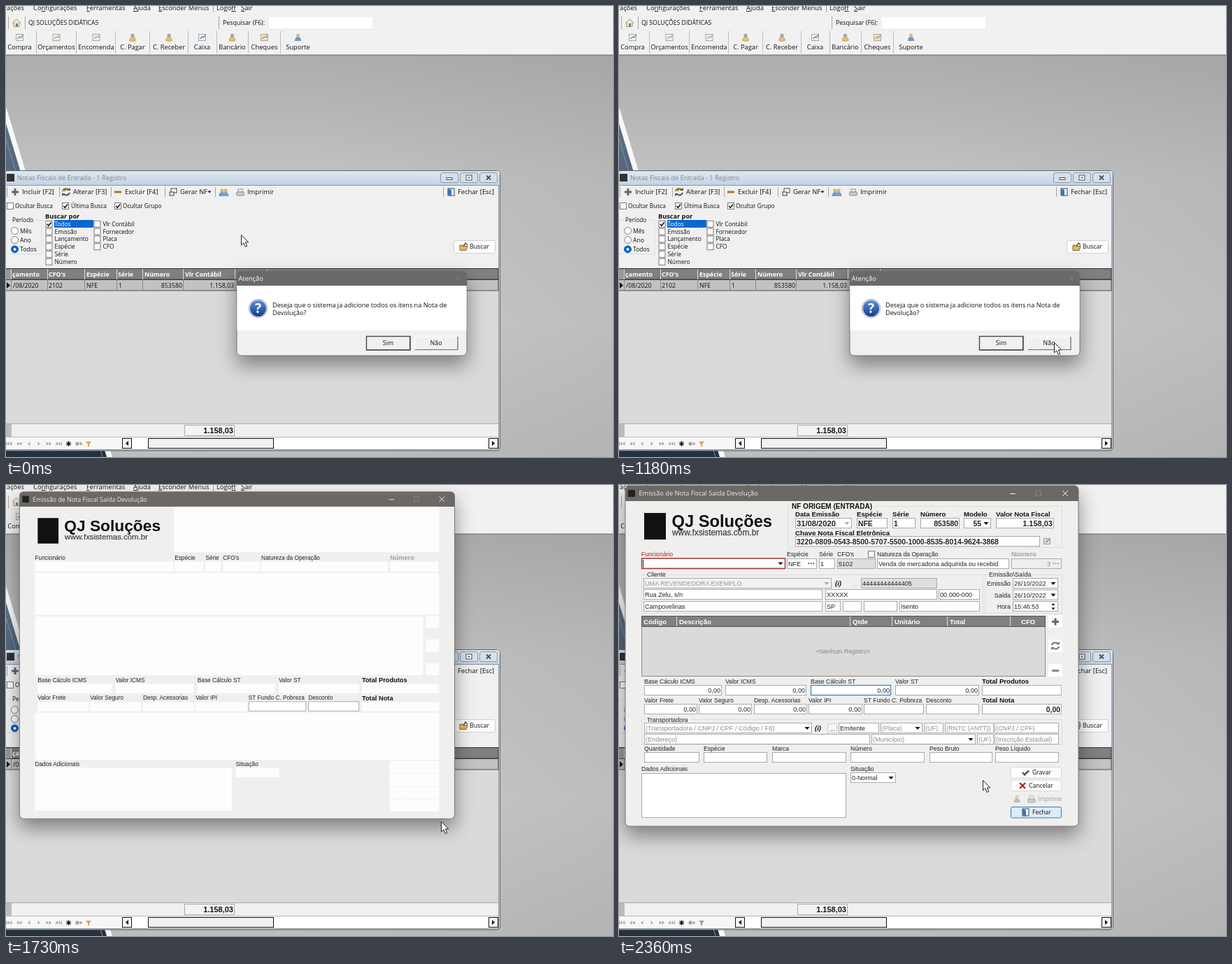
Animation, 868 px wide and 645 px high, one loop 2430 ms. Source, as an HTML page:

```html
<!DOCTYPE html>
<html lang="pt-BR">
<head>
<meta charset="utf-8">
<title>Nota de devolução</title>
<style>
html, body { margin: 0; width: 100%; height: 100%; overflow: hidden; background: #f0f0f0; }
svg { display: block; width: 100vw; height: 100vh; }
text { white-space: pre; }
.ui { font-family: "Open Sans", "Noto Sans", sans-serif; }
.form { font-family: "Liberation Sans", Arial, sans-serif; }
.shadow { filter: drop-shadow(0 13px 14px rgba(0,0,0,.42)); }
</style>
</head>
<body>
<svg id="stage" viewBox="0 0 868 645" xmlns="http://www.w3.org/2000/svg"></svg>
<script>
const LOOP = 2430;

// Drawing helpers; text y is the middle of the capitals.
const rect = (x, y, w, h, fill, stroke = 'none', more = '') =>
  `<rect x="${x}" y="${y}" width="${w}" height="${h}" fill="${fill}" stroke="${stroke}" ${more}/>`;
const path = (d, fill = 'none', stroke = 'none', width = 1) =>
  `<path d="${d}" fill="${fill}" stroke="${stroke}" stroke-width="${width}"/>`;
const circle = (x, y, r, fill, stroke = 'none') =>
  `<circle cx="${x}" cy="${y}" r="${r}" fill="${fill}" stroke="${stroke}"/>`;
const group = (id, body, cls = '') => `<g id="${id}" class="${cls}">${body}</g>`;
const escape = s => s.replace(/</g, '&lt;').replace(/>/g, '&gt;')
  .replace(/_(.)/g, '<tspan text-decoration="underline">$1</tspan>');
const text = (x, y, s, size, fill = '#111', more = '') =>
  `<text x="${x}" y="${(y + size * .36).toFixed(2)}" font-size="${size}" fill="${fill}" ${more}>${escape(s)}</text>`;
const BOLD = 'font-weight="700"', MID = 'text-anchor="middle"', END = 'text-anchor="end"';
const vline = (x, y1, y2, c = '#a5a5a5') => path(`M${x + .5} ${y1}V${y2}`, 'none', c);
const down = (x, y, c = '#111') => path(`M${x - 3.5} ${y - 1.5}h7l-3.5 4z`, c);
const plus = (x, y, c = '#666') => path(`M${x - 5} ${y}h10M${x} ${y - 5}v10`, 'none', c, 3);
const minus = (x, y, c = '#666') => path(`M${x - 5} ${y}h10`, 'none', c, 3);
const cycle = (x, y, c = '#666') => path(`M${x - 5} ${y - 1}a5 4.5 0 0 1 9 -1.5M${x + 5} ${y + 1}a5 4.5 0 0 1 -9 1.5`, 'none', c, 2)
  + path(`M${x + 1} ${y - 2}h5v-4zM${x - 1} ${y + 2}h-5v4z`, c);
const printer = (x, y, c = '#888') => rect(x - 3, y - 5, 6, 4, '#fff', c) + rect(x - 5.5, y - 1, 11, 5, '#ccc', c, 'rx="1.5"');
const person = (x, y, c) => circle(x, y - 3, 2.6, '#d8b070') + path(`M${x - 4.5} ${y + 5}q0 -6 4.5 -6t4.5 6z`, c);
const door = (x, y) => rect(x - 5, y - 5, 9, 10, '#fff', '#345') + path(`M${x - 5} ${y - 5}l5 2v9l-5 -2z`, '#3d74b5');

const check = (x, y, on) => rect(x - 4.5, y - 4.5, 9, 9, '#fff', '#777')
  + (on ? path(`M${x - 2.7} ${y}l2 2.4l3.8 -4.8`, 'none', '#111', 1.6) : '');

function desktop() {
  let s = rect(0, 0, 868, 645, 'url(#wall)') + rect(0, 0, 868, 645, 'url(#side)')
    + path('M0 144L152 645H0z', '#f7f8f9') + path('M0 168L144 645H0z', 'url(#navy)')
    + path('M0 190L138 645', 'none', '#8794a3', 1)
    + rect(0, 0, 868, 70, '#f1f1f1') + rect(0, 69.5, 868, 1.2, '#777')
    + path('M0 12.5H868M0 34.5H868', 'none', '#ebebeb');
  const menu = [[39, 'Co_nfigurações'], [115, '_Ferramentas'], [182, '_Ajuda'],
    [218, '_Esconder Menus'], [301, 'Logo_ff'], [336, '_Sair']];
  s += text(26, 2.8, 'rações', 9.4, '#111', END) + menu.map(([x, m]) => text(x, 2.8, m, 9.4)).join('')
    + vline(296, 0, 9) + vline(3, 15, 33) + vline(27, 15, 33) + vline(304, 15, 33)
    + path('M9.5 24l5.500 -5.500l5.500 5.500h-1.500v5.500h-8v-5.500z', '#f6e7c8', '#a0906e') + rect(14, 25, 3, 4, '#4f86c6')
    + text(32, 24, 'QJ SOLUÇÕES DIDÁTICAS', 8.7) + text(310, 24, 'Pesquisar (F6):', 8.9) + rect(376, 16, 148, 16, '#fff');
  const tools = [[19.5, 'Compra', 43], [72, 'Orçamentos', 100], [129, 'Encomenda', 156], [181, 'C. Pagar', 205],
    [233, 'C. Receber', 260], [280.5, 'Caixa', 301], [323.5, 'Bancário', 346], [369.5, 'Cheques', 392], [417.5, 'Suporte']];
  let icons = '';
  tools.forEach(([x, name, sep], i) => {
    s += text(x, 59, name, 9.3, '#111', MID) + (sep ? vline(sep, 36, 68, '#bbb') : '');
    if (i == 8) icons += person(x, 45, '#4f83bd');
    else if (i > 2 && i != 5 && i != 7) icons += circle(x, 42, 2.6, '#7f99ad') + path(`M${x - 5} 49l3 -5h4l3 5q-5 3 -10 0z`, '#e0b45a', '#a98032', .7);
    else icons += rect(x - 5, 40.5, 10, 9, i == 7 ? '#f3dfa5' : '#eef2f5', '#8b959d')
      + path(`M${x - 3} 47l3 -3l2 1l3 -4`, 'none', ['#5a8f55', '#dd9b35', '#d0a03a', 0, 0, '#4776aa', 0, '#b48a40'][i], 1.5);
  });
  return s + `<g opacity=".8">${icons}</g>`;
}

function titleBar(active) {
  const c = active ? '#111' : '#7c838b';
  let s = rect(-4, 235.5, 710.5, 400.5, active ? '#a9c8e8' : '#c9d7e7', active ? '#2b3a48' : '#5d646c', 'rx="5"')
    + rect(0, 236, 706, 20, active ? 'url(#on)' : 'url(#off)', 'none', 'rx="4"')
    + rect(1, 240, 11, 11, '#333') + text(16, 246, 'Notas Fiscais de Entrada - 1 Registro', 9.3, c);
  [621, 649, 677].forEach((x, i) => {
    const red = active && i == 2;
    s += rect(x + .5, 238.5, 25, 14, red ? '#b9625c' : '#d5e0ec', red ? '#6d2724' : '#8a98a8', 'rx="2.5"');
    const m = x + 13, k = red ? '#fff' : '#4a5058';
    s += i == 0 ? rect(m - 4, 245.5, 8, 3, '#fff', k) : i == 1
      ? rect(m - 4, 242, 8, 7, '#fff', k) + rect(m - 1, 244.5, 2, 2, k)
      : path(`M${m - 3} 242.5l6 6m0 -6l-6 6`, 'none', k, 1.8);
  });
  return s;
}

function listBody() {
  let s = rect(-1, 256.5, 705.5, 378, '#f0f0f0', '#8b9299')
    + [1, 76, 150, 227, 299, 625].map(x => vline(x, 259, 273)).join('')
    + plus(13, 266) + cycle(86, 266, '#555') + path('M81 264h5', 'none', '#d3a23c', 2) + minus(160, 266, '#a37b2a')
    + rect(236, 261, 8, 6, '#fff', '#444') + rect(234, 266, 6, 5, '#dfe8f0', '#444')
    + person(309, 267, '#6f9bc4') + person(314, 267, '#7ba0c2') + printer(335, 267) + door(637, 266);
  [[23, 'Incluir [F2]'], [96, 'Alterar [F3]'], [170, 'Excluir [F4]'], [249, 'Gerar NF'], [345, 'Imprimir'], [646, 'Fechar [Esc]']]
    .forEach(([x, t]) => s += text(x, 266, t, 9.4));
  s += path('M288.5 264.5h5l-2.5 3z', '#111');
  [[6, 13, 'Ocultar Busca', 0], [85, 93, 'Última Busca', 1], [160, 167, 'Ocultar Grupo', 1]]
    .forEach(([x, tx, t, on]) => s += check(x, 286, on) + text(tx, 286, t, 8.35));
  s += rect(-2, 306.5, 53, 48, 'none', '#ddd') + rect(8, 301, 33, 9, '#f0f0f0') + text(9, 306, 'Período', 8.3);
  ['Mês', 'Ano', 'Todos'].forEach((t, i) => {
    const y = 321.5 + i * 13.2;
    s += circle(12.5, y, 5, i == 2 ? '#0b62c4' : '#fff', i == 2 ? '#0b62c4' : '#777') + text(20, y, t, 8.6);
    if (i == 2) s += circle(12.5, y, 2, '#fff');
  });
  s += text(56, 301, 'Buscar por', 9.2, '#111', BOLD) + rect(69, 306, 56, 11, '#0868d2');
  ['Todos', 'Emissão', 'Lançamento', 'Espécie', 'Série', 'Número', 'Vlr Contábil', 'Fornecedor', 'Placa', 'CFO'].forEach((t, i) => {
    const x = i < 6 ? 61.5 : 130.5, y = 311.8 + (i < 6 ? i : i - 6) * 10.8;
    s += check(x, y, i == 0) + text(x + 8, y, t, 8.35, i ? '#111' : '#fff');
  });
  s += rect(640.5, 335.5, 59, 18, '#fdfdfd', '#d0d0d0', 'rx="2"') + text(663, 344, 'Buscar', 8.8)
    + path('M649 342h4l1 1.5h6l-2 6h-9z', '#e8b95a', '#7c6432') + path('M654 344l3 -5l3 3', 'none', '#555', 1.5);

  s += rect(-1, 375.5, 705, 15.5, '#808080', '#333') + rect(-1, 391.5, 705, 15.5, '#c2c2c2', '#444')
    + rect(0, 408, 704, 189, '#d9dad9') + rect(0, 377, 7, 14, '#999');
  [7, 59, 112, 158, 195, 253, 327, 373].forEach(x => s += vline(x, 376, 391, '#ddd') + vline(x, 392, 407, '#888'));
  [[9, 'çamento'], [61, "CFO's"], [115, 'Espécie'], [160, 'Série'], [198, 'Número'], [256, 'Vlr Contábil'], [331, 'Código'], [376, 'Fornecedor']]
    .forEach(([x, t]) => s += text(x, 383.5, t, 8.9, '#fff', BOLD));
  [[10, '/08/2020'], [61, '2102'], [115, 'NFE'], [161, '1'], [376, 'UMA REVENDEDORA EXEMPLO']]
    .forEach(([x, t]) => s += text(x, 399.5, t, 8.8));
  [[252, '853580'], [326, '1.158,03'], [371, '14']].forEach(([x, t]) => s += text(x, 399.5, t, 8.8, '#111', END));
  s += path('M1 395l5 4.5l-5 4.5z', '#111')
    + rect(0, 597, 704, 1, '#aaa') + rect(0, 598, 8, 18, '#bbb') + rect(255.5, 599.5, 71, 15, '#f3f3f3', '#aaa')
    + text(325, 607.5, '1.158,03', 11, '#111', 'font-family="Liberation Sans, sans-serif" ' + BOLD + ' ' + END)
    + rect(0, 616, 704, 18, '#f7f7f7') + path('M0 616.5H704', 'none', '#bbb')
    + rect(180, 618, 510, 15, '#fff')
    + rect(203.5, 618.5, 179, 14, '#f0f0f0', '#111') + rect(166.5, 618.5, 13, 14, '#f5f5f5', '#111') + rect(690.5, 618.5, 13, 14, '#f5f5f5', '#111')
    + path('M175 622v7l-4 -3.5zM695 622v7l4 -3.5z', '#111');
  for (let i = 0; i < 6; i++) {
    const x = 5 + i * 14, d = i < 3 ? -1 : 1, twice = i != 2 && i != 3;
    const tri = o => path(`M${x + d * (2 + o)} 626l${-d * 3.5} -2.7v5.4z`, '#aaa');
    s += twice ? tri(-2) + tri(2) : tri(0);
    if (i == 0 || i == 5) s += vline(x + d * 4.5 - .5, 623, 629, '#aaa');
  }
  const star = (x, r, c) => path(`M${x - r} 626h${2 * r}M${x} ${626 - r}v${2 * r}M${x - r * .7} ${626 - r * .7}l${r * 1.4} ${r * 1.4}m0 ${-r * 1.4}l${-r * 1.4} ${r * 1.4}`, 'none', c, 1.1);
  return s + star(89.5, 3.8, '#111') + star(102, 3, '#999') + star(107, 2, '#aaa')
    + `<path id="funnel" d="M114 623h8l-3 3.5v3.5h-2v-3.5z"/>`;
}

function dialog() {
  const button = (x, t, id) => path(`M${x} 491.5V473.500h61`, 'none', '#fff') + path(`M${x} 491.5h61.5V473`, 'none', '#666', 1.2)
    + rect(x - .5, 472.5, 62.5, 19.5, 'none', '#444', `id="${id}" stroke-width="1.4"`) + text(x + 30.5, 482, t, 8.9, '#111', MID);
  return rect(330, 379, 329, 121, '#f0f0f0', '#777', 'rx="6" class="shadow"')
    + path('M330 400v-15q0 -6 6 -6h317q6 0 6 6v15z', '#6b6967') + rect(330.5, 400, 328, 64, '#fff')
    + text(332.5, 389.5, 'Atenção', 9.3, '#fff') + path('M643.5 386.5l6 6m0 -6l-6 6', 'none', '#8d8b89')
    + circle(360.5, 432.5, 13.2, '#d7dbe2', '#aab') + circle(360.5, 432.5, 11.5, 'url(#ball)')
    + text(360.5, 432.5, '?', 19, '#fff', BOLD + ' ' + MID)
    + text(381, 427.5, 'Deseja que o sistema ja adicione todos os itens na Nota de', 9.15) + text(381, 438.3, 'Devolução?', 9.15)
    + button(516, 'Sim', 'focusYes') + button(584.5, 'Não', 'focusNo');
}

const lab = (x, y, s, c = '#222') => text(x, y, s, 8.65, c);
const strong = (x, y, s, size = 9.65, c = '#111') => text(x, y, s, size, c, BOLD);
const white = (x, y, w, h) => rect(x, y, w, h, '#fdfdfd');

// Input from x to x2; opt: c text colour, bg, edge, end (right-aligned), bold, arrow, size
function field(x, x2, y, s = '', opt = {}) {
  const { c = '#222', bg = '#fff', edge = '#aaa', end, bold, arrow, size = bold ? 10.4 : 9.1 } = opt;
  return rect(x + .5, y, x2 - x - 1, 14, bg, edge)
    + (s ? text(end ? x2 - 2 : x + 2, y + 7.5, s, size, c, (end ? END : '') + (bold ? ' ' + BOLD : '')) : '')
    + (arrow ? down(x2 - 7, y + 7, arrow) : '');
}
const frame = (x, y, w, h) => rect(x + .5, y + .5, w, h, 'none', '#dcdcdc');
const rowOne = [[36, 147, 'Base Cáculo ICMS'], [152, 268, 'Valor ICMS'], [274, 389, 'Base Cálculo ST'], [395, 515, 'Valor ST']];
const rowTwo = [[36, 112, 'Valor Frete'], [114, 190, 'Valor Seguro'], [193, 269, 'Desp. Acessorias'], [271, 348, 'Valor IPI'],
  [350, 436, 'ST Fundo C. Pobreza'], [439, 515, 'Desconto']];

function formBase() {
  let s = rect(9, 1, 648, 487, '#efefee', '#777', 'rx="6" class="shadow"') + path('M9 23V7q0 -6 6 -6h636q6 0 6 6v16z', '#6b6866')
    + rect(13, 7, 10, 10, '#222') + text(28.5, 12, 'Emissão de Nota Fiscal Saída Devolução', 9.2, '#eee', 'class="ui"')
    + path('M559 12.5h8M634 8l8 8m0 -8l-8 8', 'none', '#eee') + rect(596.5, 8.5, 7, 7, 'none', '#858380')
    + rect(36, 40, 31, 38, '#111') + text(75.5, 51.5, 'QJ Soluções', 23.7, '#111', BOLD)
    + text(76, 67.5, 'www.fxsistemas.com.br', 11.9, '#444', 'stroke="#444" stroke-width=".25"')
    + white(239, 23, 395, 68) + white(32, 122, 602, 62);
  [[32, 238], [240, 283], [286, 309], [312, 367], [369, 558], [561, 633]].forEach(([a, b]) => s += white(a, 105, b - a, 15));
  s += lab(32, 99, 'Funcionário') + lab(240, 99, 'Espécie') + lab(286, 99, 'Série') + lab(312, 99, "CFO's")
    + lab(369, 99, 'Natureza da Operação') + strong(561, 99, 'Número', 9.5, '#a0a0a0')
    + white(32, 187, 578, 87) + [186, 221, 256].map(y => white(614, y, 20, 18)).join('');
  rowOne.forEach(([a, b, t]) => s += lab(a, 281, t) + white(a, 287, b - a, 14));
  rowTwo.forEach(([a, b, t], i) => s += lab(a, 308, t) + (i < 4 ? white(a, 314, b - a, 14) : field(a, b, 313.5)));
  return s + strong(519, 281, 'Total Produtos') + strong(519, 308, 'Total Nota') + white(519, 287, 115, 14) + white(519, 314, 115, 14)
    + white(32, 330, 602, 70) + lab(32, 406, 'Dados Adicionais') + white(32, 412, 293, 64)
    + lab(331, 406, 'Situação') + white(331, 412, 65, 14) + white(560, 402, 74, 75)
    + path('M560 420.5h74M560 439.5h74M579 440v19M560 459.5h74', 'none', '#f3f3f3');
}

function formFields() {
  const dim = { c: '#8b8b8b' }, b = { bold: 1 }, bend = { bold: 1, end: 1 };
  let s = rect(239, 23, 396, 70, '#efefee') + frame(241, 30, 392, 59) + rect(245, 26, 120, 9, '#efefee') + strong(247, 30, 'NF ORIGEM (ENTRADA)', 10);
  [[252, 'Data Emissão'], [340, 'Espécie'], [391, 'Série'], [431, 'Número'], [493, 'Modelo'], [539, 'Valor Nota Fiscal']]
    .forEach(([x, t]) => s += strong(x, 41.5, t));
  s += field(252, 333, 47.5, '31/08/2020', { bold: 1, size: 11.2, arrow: '#aaa' }) + field(340, 384, 47.5, 'NFE', b) + field(391, 424, 47.5, '1', b)
    + field(431, 487, 47.5, '853580', bend) + field(493, 532, 47.5, '    55', { bold: 1, arrow: '#111' }) + field(539, 622, 47.5, '1.158,03', { bold: 1, end: 1, size: 11 })
    + strong(252, 68, 'Chave Nota Fiscal Eletrônica', 9.85) + field(252, 602, 73.5, '3220-0809-0543-8500-5707-5500-1000-8535-8014-9624-3868', b)
    + rect(607.5, 76.5, 9, 8, '#ddd', '#999') + path('M610 82l5 -4', 'none', '#777', 1.5) + check(361, 99, 0)
    + rect(32, 122, 602, 63, '#efefee') + frame(32, 128, 488, 55) + frame(523, 128, 110, 55)
    + rect(38, 124, 32, 8, '#efefee') + rect(527, 124, 66, 8, '#efefee')
    + lab(40, 128, 'Cliente') + text(529, 128, 'Emissão\\Saída', 9, '#222');
  s += field(35, 304, 133.5, 'UMA REVENDEDORA EXEMPLO', { c: '#999', bg: '#f2f2f2', arrow: '#aaa' }) + text(309, 140.5, '(i)', 9.5, '#111', BOLD + ' font-style="italic"')
    + text(333, 142, '...', 9, '#aaa') + field(346, 455, 133.5, '44444444444405', { bg: '#dedede' })
    + field(35, 291, 149.5, 'Rua Zelu, s/n') + field(295, 455, 149.5, 'XXXXX') + field(457, 516, 149.5, '00.000-000')
    + field(35, 291, 166.5, 'Campovelinas') + field(295, 317, 166.5, 'SP') + field(320, 347, 166.5) + field(350, 398, 166.5) + field(401, 516, 166.5, 'Isento');
  [['Emissão', '26/10/2022'], ['Saída', '26/10/2022'], ['Hora', '15:46:53']].forEach(([t, v], i) => {
    const y = 133.5 + i * 16.5;
    s += text(560, y + 7.3, t, 8.9, '#222', END) + field(563, 628, y, v, { arrow: i < 2 && '#111' });
  });
  s += path('M618.5 172l2.5 -3l2.5 3zM618.5 175.5l2.5 3l2.5 -3z', '#111')
    + rect(32, 330, 602, 70, '#efefee') + frame(32, 335, 601, 36) + rect(38, 331, 64, 8, '#efefee') + lab(40, 335.5, 'Transportadora')
    + field(36, 276, 340.5, '(Transportadora / CNPJ / CPF / Código / F8)', { c: '#8b8b8b', size: 9.35, arrow: '#111' })
    + text(280, 348, '(i)', 9.5, '#111', BOLD + ' font-style="italic"') + rect(298.5, 341.5, 13, 13, '#f6f6f6', '#ccc') + text(301, 349, '...', 9)
    + field(314, 372, 340.5, 'Emitente') + field(374, 434, 340.5, '(Placa)', { c: '#8b8b8b', arrow: '#111' }) + field(436, 464, 340.5, '(UF)', dim)
    + field(466, 536, 340.5, '(RNTC (ANTT))', dim) + field(537, 629, 340.5, '(CNPJ / CPF)', dim)
    + field(36, 359, 356.5, '(Endereço)', dim) + field(361, 510, 356.5, '(Município)', { c: '#8b8b8b', arrow: '#111' })
    + field(512, 536, 356.5, '(UF)', dim) + field(537, 629, 356.5, '(Inscrição Estadual)', dim);
  [[36, 115, 'Quantidade'], [121, 212, 'Espécie'], [219, 325, 'Marca'], [331, 437, 'Número'], [444, 534, 'Peso Bruto'], [538, 629, 'Peso Líquido']]
    .forEach(([x, x2, t]) => s += lab(x, 376.5, t) + field(x, x2, 382.5));
  return s;
}

function formDone() {
  let s = rect(31, 95, 50, 8, '#efefee') + lab(32, 99, 'Funcionário', '#b02020')
    + field(32, 238, 105, '', { arrow: '#111' }) + rect(32.5, 105, 205, 14.5, 'none', '#a83434', 'stroke-width="1.4"') + vline(34, 107, 118, '#222')
    + field(240, 283, 105.5, 'NFE') + text(270, 112, '···', 10, '#111', BOLD) + field(286, 309, 105.5, '1') + field(312, 367, 105.5, '5102', { bg: '#dedede' })
    + field(369, 558, 105.5, 'Venda de mercadoria adquirida ou recebid') + field(561, 633, 105.5, '', { bg: '#eee' })
    + text(617, 113, '3', 9.1, '#888', END) + text(620, 112, '···', 10, '#888', BOLD)
    + rect(32.5, 187.5, 577, 86, '#d9dad9', '#8a8a8a') + rect(32.5, 187.5, 577, 15, '#808080', '#555');
  [83, 331, 391, 470, 560].forEach(x => s += vline(x - 1, 188, 202, '#ddd'));
  [[35, 'Código'], [86, 'Descrição'], [334, 'Qtde'], [394, 'Unitário'], [473, 'Total'], [575, 'CFO']].forEach(([x, t]) => s += text(x, 195.5, t, 9.6, '#fff', BOLD));
  s += text(320.5, 238, '<Nenhum Registro>', 8.7, '#888', MID) + plus(624, 195.5) + cycle(624, 230, '#777') + minus(624, 265.5, '#888');
  rowOne.forEach(([a, b]) => s += field(a, b, 286.5, '0,00', { end: 1 }));
  rowTwo.slice(0, 4).forEach(([a, b]) => s += field(a, b, 313.5, '0,00', { end: 1 }));
  s += rect(274.5, 286.5, 114, 14, 'none', '#3f84c4', 'id="hover" stroke-width="1.3"')
    + field(519, 633, 286.5) + field(519, 633, 313.5, '0,00', { end: 1, bold: 1 })
    + rect(32.5, 412.5, 292, 63, '#fff', '#aaa') + field(331, 396, 411.5, '0-Normal', { size: 8.9, arrow: '#111' }) + rect(559, 401, 76, 77, '#efefee');
  [403, 421.5, 460].forEach((y, i) => s += rect(560.5, y + .5, 72, 15.5, i == 2 ? '#dcebf8' : '#fdfdfd', i == 2 ? '#2c7cc4' : '#d8d8d8', 'rx="2"'));
  [['Gravar', 411, 591], ['Cancelar', 430, 586], ['Imprimir', 449, 599], ['Fechar', 468, 591]]
    .forEach(([t, y, x], i) => s += text(x, y, t, 8.6, i == 2 ? '#999' : '#111', 'class="ui"'));
  return s + path('M577 411l3 3.5l6 -6', 'none', '#555', 2.5) + path('M573 426l8 8m0 -8l-8 8', 'none', '#b32626', 2.4)
    + `<g opacity=".5">${person(569, 449, '#888')}</g>` + printer(590, 450, '#aaa') + door(582, 468);
}

const stop = (o, c, a = 1) => `<stop offset="${o}" stop-color="${c}" stop-opacity="${a}"/>`;
const grad = (id, dir, stops) => `<linearGradient id="${id}" x1="0" y1="0" ${dir}>${stops}</linearGradient>`;
const V = 'x2="0" y2="1"', H = 'x2="1" y2="0"';

document.getElementById('stage').innerHTML = '<defs>'
  + grad('wall', V, stop(.1, '#acacac') + stop(.38, '#c2c2c2') + stop(.7, '#c9c9c9') + stop(1, '#bdbdbd'))
  + grad('side', H, stop(.5, '#888', 0) + stop(1, '#888', .18))
  + grad('navy', V, stop(0, '#5d7186') + stop(.25, '#4b6078') + stop(1, '#25303d'))
  + grad('off', V, stop(0, '#dfe8f1') + stop(1, '#c3d2e3')) + grad('on', V, stop(0, '#c3d9ef') + stop(1, '#99bce0'))
  + grad('ball', V, stop(0, '#5a8fd6') + stop(1, '#123f92')) + '</defs>'
  + group('base', desktop() + group('idle', titleBar(false)) + group('active', titleBar(true)) + listBody(), 'ui')
  + group('ask', dialog(), 'ui')
  + group('form', formBase() + group('fields', formFields()) + group('done', formDone()), 'form')
  + group('mouse', path('M0 0V14.3L3.3 11.3L5.7 17L8.2 15.9L5.8 10.4H10.2z', '#fff', '#222'));

const el = id => document.getElementById(id);
const show = (id, on) => el(id).setAttribute('display', on ? 'inline' : 'none');
const run = (start, count) => Array.from({ length: count }, (_, i) => start + i * 70);
const ticks = [...run(0, 4), ...run(270, 5), ...run(610, 7), 1180, ...run(1380, 15)];

// [ms, x, y] of the pointer tip
const trail = [[0, 336, 327], [70, 318, 372], [140, 276, 505], [210, 254, 585], [270, 300, 601], [340, 420, 575], [410, 540, 510],
  [480, 612, 462], [550, 633, 449], [610, 632, 448], [680, 628, 453], [820, 626, 467], [1030, 623, 481], [1180, 622, 481],
  [1870, 622, 481], [1940, 600, 462], [2010, 520, 390], [2080, 420, 318], [2150, 372, 293], [2220, 385, 300], [2290, 450, 360], [2360, 520, 422]];
// [ms, opacity, scale]
const asking = [[0, 1, 1], [1450, 1, 1], [1520, .85, .993], [1590, .52, .979], [1660, 0, .95]];
const opening = [[1590, 0, .88], [1660, .35, .91], [1730, 1, .96], [1800, 1, .99], [1870, 1, 1]];

function at(keys, t) {
  const i = keys.findIndex(k => k[0] > t);
  if (i < 0) return keys[keys.length - 1].slice(1);
  if (i == 0) return keys[0].slice(1);
  const a = keys[i - 1], b = keys[i], f = (t - a[0]) / (b[0] - a[0]);
  return [1, 2].map(n => a[n] + (b[n] - a[n]) * f);
}

function pose(id, keys, t, cx, cy) {
  const [alpha, k] = at(keys, t);
  show(id, alpha > 0);
  el(id).setAttribute('opacity', alpha);
  el(id).setAttribute('transform', `translate(${cx} ${cy}) scale(${k}) translate(${-cx} ${-cy})`);
}

function draw(ms) {
  const t = ticks.filter(v => v <= ms).pop();
  const active = t >= 1520 && t < 1660;
  show('active', active);
  show('idle', !active);
  show('focusYes', t < 1380);
  show('focusNo', t >= 1380);
  pose('ask', asking, t, 452, 412);
  pose('form', opening, t, 269, 221);
  show('fields', t >= 1800);
  show('done', t >= 1940);
  show('hover', t >= 2150);
  el('funnel').setAttribute('fill', t < 1870 ? '#d9a83a' : '#999');
  const [x, y] = at(trail, t);
  el('mouse').setAttribute('transform', `translate(${x + .5} ${y + .5})`);
}

const began = performance.now();
function tick() {
  draw((performance.now() - began) % LOOP);
  requestAnimationFrame(tick);
}
tick();
</script>
</body>
</html>
```
